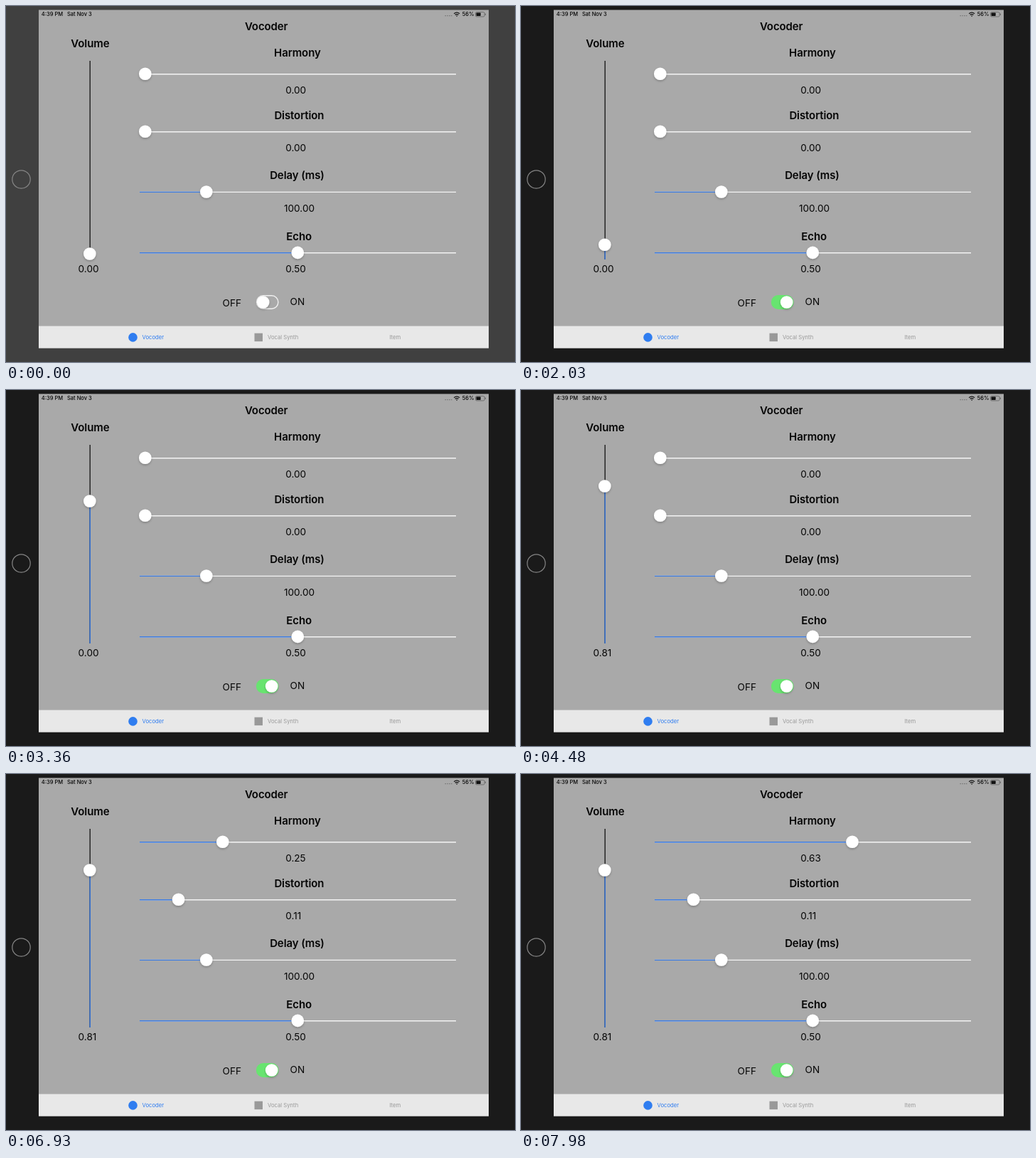
These frames come from a looping animation (716x500 px, 8 s). An HTML page:

```html
<!DOCTYPE html>
<html lang="en">
<head>
<meta charset="utf-8">
<title>Vocoder panel</title>
<style>
html, body { margin: 0; width: 100%; height: 100%; overflow: hidden; background: #1a1a1a; }
svg { display: block; width: 716px; height: 500px; }
text { font-family: Inter, "Liberation Sans", sans-serif; fill: #060606; }
.head { font-size: 15px; font-weight: 600; letter-spacing: -.1px; text-anchor: middle; }
.val { font-size: 13.6px; }
.bar { font-size: 7.5px; font-weight: 500; }
.tab { font-size: 7.7px; fill: #999; }
.knob { fill: #fff; filter: url(#shade); }
.track { fill: none; stroke-width: 1.4; }
</style>
</head>
<body>
<svg id="stage" viewBox="0 0 716 500" xmlns="http://www.w3.org/2000/svg">
  <defs>
    <filter id="shade" x="-50%" y="-50%" width="200%" height="200%">
      <feDropShadow dx="0" dy="1.6" stdDeviation="1.6" flood-color="#000" flood-opacity=".25"/>
    </filter>
  </defs>
  <rect id="bezel" width="716" height="500"/>
  <circle cx="21.5" cy="243.5" r="12.7" fill="none" stroke="#858585" stroke-width="1.2"/>
  <rect x="46" y="5.5" width="633" height="475" fill="#a9a9a9"/>
  <rect x="46" y="449.5" width="633" height="31" fill="#e8e8e8"/>

  <text class="bar" x="49.8" y="14.4">4:39 PM</text>
  <text class="bar" x="86" y="14.4">Sat Nov 3</text>
  <text class="bar" x="641.8" y="14.4">56%</text>
  <path d="M617.5 13.6h10" stroke="#777" stroke-width="1.4" stroke-dasharray="1.5 1.3"/>
  <g fill="none" stroke="#111" stroke-width="1.3">
    <path d="M630.2 10.8q3.9-3.2 7.8 0M631.7 12.6q2.4-2 4.8 0"/>
    <circle cx="634.1" cy="14.1" r=".5" fill="#111" stroke-width=".5"/>
  </g>
  <rect x="660.5" y="8.6" width="12.6" height="6.4" rx="1.6" fill="none" stroke="#555" stroke-width=".7"/>
  <rect x="661.5" y="9.6" width="6.2" height="4.4" rx=".7" fill="#111"/>
  <path d="M674.3 10.7v2.2" stroke="#555" stroke-width=".9"/>

  <text class="head" x="366.2" y="33.6">Vocoder</text>
  <text class="head" x="118.4" y="57.6">Volume</text>
  <g id="sliders"></g>

  <text class="val" x="304.6" y="422">OFF</text>
  <text class="val" x="399.6" y="419.6">ON</text>
  <rect id="pill"/>
  <rect id="pillHole"/>
  <rect id="thumb" class="knob" y="407.2" height="17.6" rx="8.8"/>

  <circle cx="178.5" cy="465.4" r="6.3" fill="#2f7df0"/>
  <text class="tab" x="191.6" y="468.1" style="fill:#2f7df0">Vocoder</text>
  <rect x="349.5" y="459.6" width="11.5" height="11.5" fill="#999"/>
  <text class="tab" x="368" y="468.1">Vocal Synth</text>
  <text class="tab" x="539.4" y="468.1">Item</text>
</svg>
<script>
const LOOP = 8000, STEP = 70;
const BLUE = '#3a7ae2';
const $ = id => document.getElementById(id);
const clamp = v => Math.max(0, Math.min(1, v));
const mix = (a, b, k) => a + (b - a) * k;
const smooth = k => k * k * (3 - 2 * k);
const phase = (t, a, b) => smooth(clamp((t - a) / (b - a)));

function set(el, attrs) {
  for (const k in attrs) el.setAttribute(k, attrs[k]);
}

function add(tag, attrs, text = '') {
  const el = document.createElementNS('http://www.w3.org/2000/svg', tag);
  set(el, attrs);
  el.textContent = text;
  $('sliders').append(el);
  return el;
}

// Linear path through [time, position] points.
function along(points, t) {
  let [t0, p0] = points[0];
  for (const [t1, p1] of points) {
    if (t < t1) return mix(p0, p1, clamp((t - t0) / (t1 - t0)));
    [t0, p0] = [t1, p1];
  }
  return p0;
}

function row(name, y, midX, headY, valX, valY, value) {
  add('text', { class: 'head', x: midX, y: headY }, name);
  add('path', { class: 'track', d: `M188 ${y + .4}H633`, stroke: '#f4f4f4' });
  const fill = add('path', { class: 'track', stroke: BLUE });
  const knob = add('circle', { class: 'knob', cy: y, r: 8.8 });
  const label = add('text', { class: 'val', x: valX, y: valY }, value);
  return (x, text = value) => {
    set(fill, { d: `M188 ${y + .4}H${x}` });
    set(knob, { cx: x });
    label.textContent = text;
  };
}

const harmony = row('Harmony', 95.3, 409.9, 70.9, 393.2, 122.9, '0.00');
const distortion = row('Distortion', 176.3, 412.4, 158.6, 393.2, 203.9, '0.00');
row('Delay (ms)', 261, 409.5, 243.4, 391, 288.7, '100.00')(281.8);
row('Echo', 346.4, 412.2, 328.6, 393.2, 374, '0.50')(410.3);

add('path', { class: 'track', d: 'M118.2 77V356', stroke: '#1c1c1c' });
const volFill = add('path', { class: 'track', stroke: BLUE });
const volKnob = add('circle', { class: 'knob', cx: 117.8, r: 8.8 });
const volText = add('text', { class: 'val', x: 101.6, y: 374 });

const LEFT = 195.8, RIGHT = 624.4;
const level = x => ((x - LEFT) / (RIGHT - LEFT)).toFixed(2);

const volPath = [[1750, 348], [1960, 341], [2240, 318], [2520, 285], [2730, 262],
  [2940, 227], [3150, 188], [3360, 156], [3500, 142], [3710, 135]];
const distPath = [[4620, LEFT], [4760, 199], [4900, 200], [5180, 219], [5460, 238], [5670, 242.6]];
const harmPath = [[5950, LEFT], [6230, 204.6], [6440, 228], [6720, 270], [7070, 328],
  [7420, 390.6], [7560, 422], [7770, 448], [7980, 466]];

function toggle(t) {
  const press = phase(t, 900, 1190);
  const on = phase(t, 1190, 1450);
  const wide = 17.6 + 3.5 * press * (1 - on);
  const x = mix(352.9, 382.5 - wide, on);
  const hole = (1 - press) * .5;
  set($('pill'), { x: 351.8, y: 406.1, width: 31.8, height: 19.8, rx: 9.9,
    fill: `rgb(${mix(240, 104, on)},${mix(240, 228, on)},${mix(240, 112, on)})` });
  const gap = mix(9.9, 1.4, Math.sqrt(hole * 2));
  set($('pillHole'), { x: 351.8 + gap, y: 406.1 + gap, width: 31.8 - 2 * gap,
    height: 19.8 - 2 * gap, rx: 9.9 - gap, fill: '#a9a9a9',
    visibility: press < 1 ? 'visible' : 'hidden' });
  set($('thumb'), { x, width: wide });
}

function draw(time) {
  const t = Math.floor((time % LOOP) / STEP) * STEP;
  set($('bezel'), { fill: t < 980 ? '#404040' : '#1a1a1a' });

  const v = along(volPath, t);
  set(volKnob, { cy: v });
  set(volFill, { d: `M118.2 ${v}V356` });
  volText.textContent = t < 3990 ? '0.00' : '0.81';

  const d = along(distPath, t), h = along(harmPath, t);
  distortion(d, level(d));
  harmony(h, level(h));
  toggle(t);
}

const start = performance.now();
function tick() {
  draw(performance.now() - start);
  requestAnimationFrame(tick);
}
tick();
</script>
</body>
</html>
```
